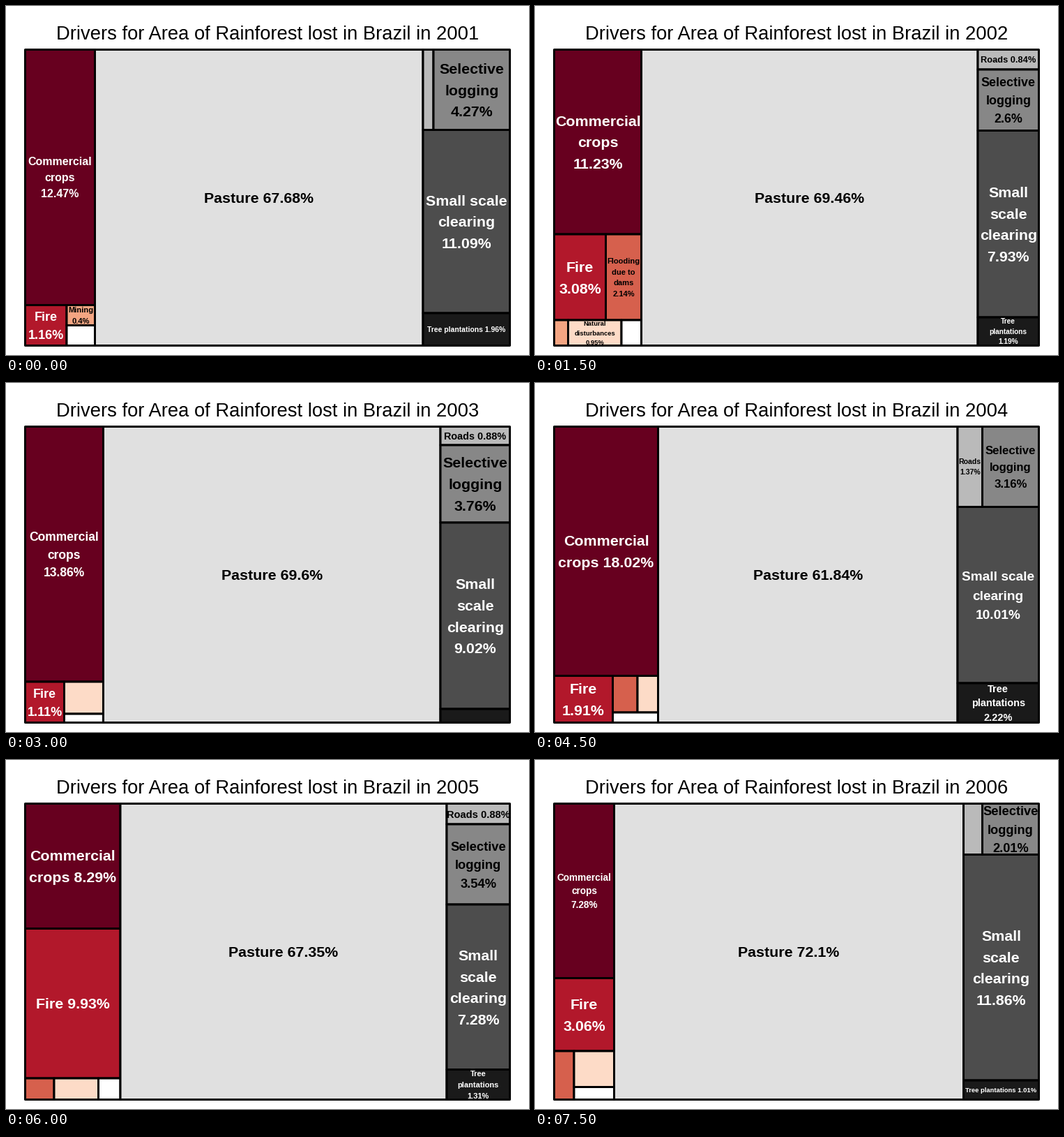
Write a matplotlib script that moves like this. It is 750 by 500 pixels and loops after 8000 ms.

```python
import matplotlib.pyplot as plt
from matplotlib.animation import FuncAnimation
from matplotlib.patches import Rectangle

W, H, DPI = 750, 500, 72          # at 72 dpi one point is one pixel
STEP, FRAMES, HOLD = 500, 16, 3   # each year stays for HOLD steps
BIG = 21.33
LEADING = 1.44
FRAME = (27.5, 62.5, 722.5, 486.5)

# driver: (fill, text colour, name)
DRIVERS = {
    "crops": ("#67001f", "white", "Commercial crops"),
    "fire": ("#b2182b", "white", "Fire"),
    "flood": ("#d6604d", "black", "Flooding due to dams"),
    "mining": ("#f4a582", "black", "Mining"),
    "nature": ("#fddbc7", "black", "Natural disturbances"),
    "other": ("#ffffff", "black", ""),
    "pasture": ("#e0e0e0", "black", "Pasture"),
    "roads": ("#bababa", "black", "Roads"),
    "logging": ("#878787", "black", "Selective logging"),
    "clearing": ("#4d4d4d", "white", "Small scale clearing"),
    "trees": ("#1a1a1a", "white", "Tree plantations"),
}


def tile(key, share=None, breaks=(), size=BIG):
    """A leaf; breaks are the word numbers that start a new line."""
    if share is None:
        return ("tile", key, [], size)
    words = DRIVERS[key][2].split() + [f"{share:g}%"]
    cuts = [0, *breaks, len(words)]
    lines = [" ".join(words[a:b]) for a, b in zip(cuts, cuts[1:])]
    return ("tile", key, lines, size)


def cols(*parts):
    """Children side by side, with the x of each divider between them."""
    return ("cols", parts)


def rows(*parts):
    """Children stacked, with the y of each divider between them."""
    return ("rows", parts)


YEARS = [
    cols(
        rows(tile("crops", 12.47, (1, 2), 16), 428.5,
             cols(tile("fire", 1.16, (1,), 18), 87,
                  rows(tile("mining", 0.4, (1,), 11.1), 457.5, tile("other")))),
        127.5, tile("pasture", 67.68), 598,
        rows(cols(tile("roads"), 613, tile("logging", 4.27, (1, 2))), 177.5,
             tile("clearing", 11.09, (2, 3)), 440,
             tile("trees", 1.96, (), 10.4))),
    cols(
        rows(tile("crops", 11.23, (1, 2)), 327,
             cols(tile("fire", 3.08, (1,)), 101.5,
                  tile("flood", 2.14, (1, 3, 4), 11.1)), 450,
             cols(tile("mining"), 47.5,
                  tile("nature", 0.95, (1, 2), 9.4), 124, tile("other"))),
        152.5, tile("pasture", 69.46), 635,
        rows(tile("roads", 0.84, (), 12.8), 91,
             tile("logging", 2.6, (1, 2), 17.9), 178.5,
             tile("clearing", 7.93, (1, 2, 3)), 446,
             tile("trees", 1.19, (1, 2), 10.1))),
    cols(
        rows(tile("crops", 13.86, (1, 2), 17.5), 428,
             cols(tile("fire", 1.11, (1,), 18), 83.5,
                  rows(tile("nature"), 474, tile("other")))),
        139.5, tile("pasture", 69.6), 623,
        rows(tile("roads", 0.88, (), 14.4), 89,
             tile("logging", 3.76, (1, 2)), 200,
             tile("clearing", 9.02, (1, 2, 3)), 467, tile("trees"))),
    cols(
        rows(tile("crops", 18.02, (1,)), 419.5,
             cols(tile("fire", 1.91, (1,)), 111.5,
                  rows(cols(tile("flood"), 147, tile("nature")), 472,
                       tile("other")))),
        176.5, tile("pasture", 61.84), 606,
        rows(cols(tile("roads", 1.37, (1,), 10.5), 641.5,
                  tile("logging", 3.16, (1, 2), 16.7)), 177.5,
             tile("clearing", 10.01, (2, 3), 19.1), 430,
             tile("trees", 2.22, (1, 2), 14.5))),
    cols(
        rows(tile("crops", 8.29, (1,)), 241.5,
             tile("fire", 9.93), 456,
             cols(tile("flood"), 69, tile("nature"), 132.5, tile("other"))),
        164, tile("pasture", 67.35), 632,
        rows(tile("roads", 0.88, (), 14.6), 92,
             tile("logging", 3.54, (1, 2), 18.4), 207,
             tile("clearing", 7.28, (1, 2, 3)), 443.5,
             tile("trees", 1.31, (1, 2), 11))),
    cols(
        rows(tile("crops", 7.28, (1, 2), 13.6), 312.5,
             tile("fire", 3.06, (1,)), 417,
             cols(tile("flood"), 56,
                  rows(tile("nature"), 468.5, tile("other")))),
        113.5, tile("pasture", 72.1), 614.5,
        rows(cols(tile("roads"), 641.5, tile("logging", 2.01, (1, 2), 18.2)),
             135.5, tile("clearing", 11.86, (1, 2, 3)), 459,
             tile("trees", 1.01, (), 9.4))),
]

plt.rcParams["font.family"] = "Liberation Sans"
fig = plt.figure(figsize=(W / DPI, H / DPI), dpi=DPI, facecolor="white")
ax = fig.add_axes([0, 0, 1, 1])


def place(node, box):
    """Yield every leaf below node with its box."""
    if node[0] == "tile":
        yield node[1:], box
        return
    kind, parts = node
    x0, y0, x1, y1 = box
    lo, hi = (x0, x1) if kind == "cols" else (y0, y1)
    edges = [lo, *parts[1::2], hi]
    for child, a, b in zip(parts[::2], edges, edges[1:]):
        yield from place(child, (a, y0, b, y1) if kind == "cols" else (x0, a, x1, b))


def draw_tile(leaf, box):
    key, lines, size = leaf
    x0, y0, x1, y1 = box
    fill, ink, _ = DRIVERS[key]
    ax.add_patch(Rectangle((x0, y0), x1 - x0, y1 - y0, fc=fill, ec="black",
                           lw=3, joinstyle="round", snap=False, zorder=1))
    mid = (len(lines) - 1) / 2
    for i, line in enumerate(lines):
        y = (y0 + y1) / 2 + (i - mid) * size * LEADING + 0.36 * size
        ax.text((x0 + x1) / 2, y, line, size=size, weight="bold", color=ink,
                ha="center", va="baseline", zorder=2)


def draw(frame):
    ax.clear()
    ax.set(xlim=(0, W), ylim=(H, 0))
    ax.axis("off")
    year = frame // HOLD
    ax.text(W / 2, 48, f"Drivers for Area of Rainforest lost in Brazil in {2001 + year}",
            size=27.4, color="black", ha="center", va="baseline")
    for leaf, box in place(YEARS[year], FRAME):
        draw_tile(leaf, box)
    return []


anim = FuncAnimation(fig, draw, frames=FRAMES, init_func=lambda: [],
                     interval=STEP, repeat=True, repeat_delay=0)
plt.show()
```
